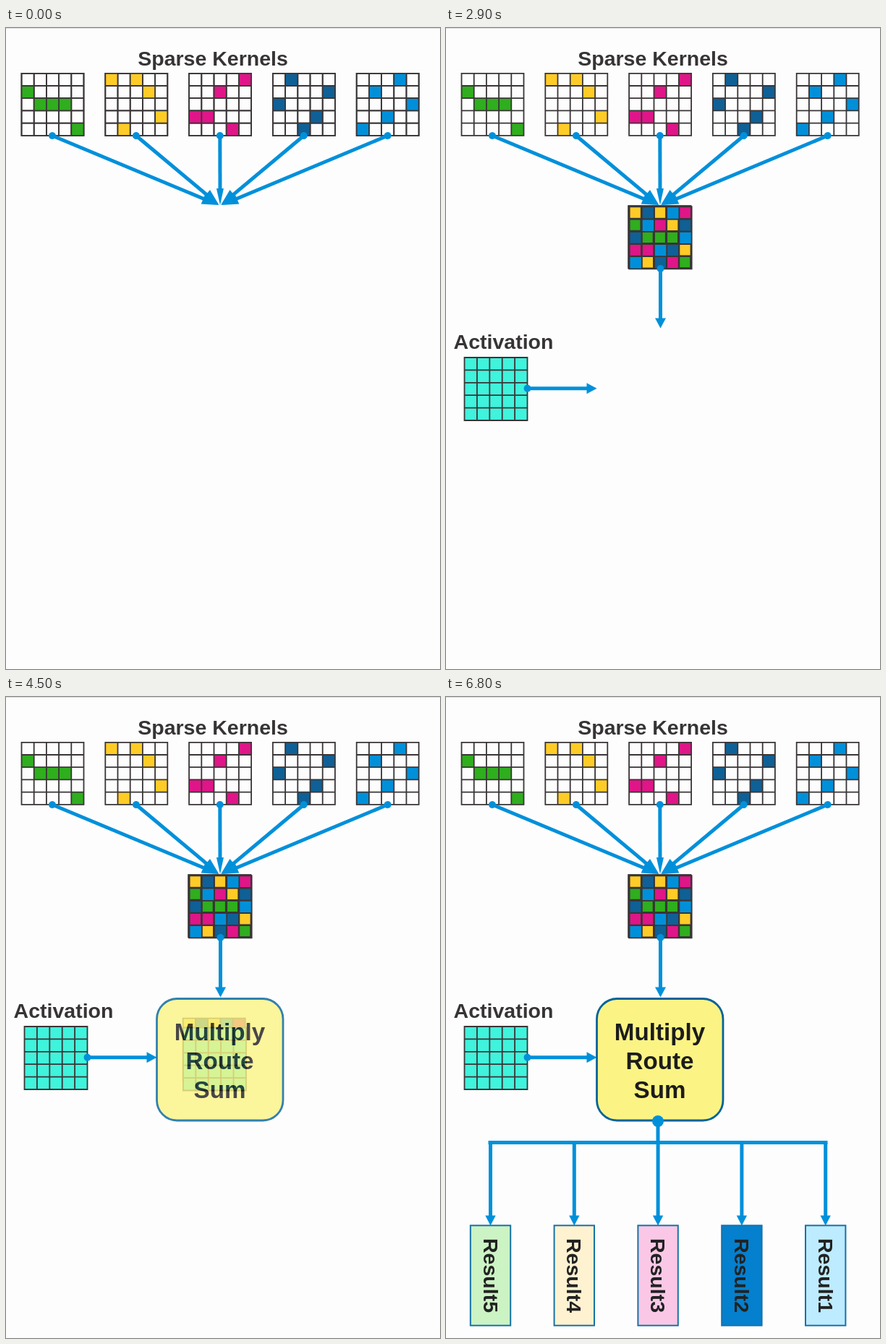
An HTML page for the animation above (6900 ms loop, 600 by 887 pixels).

```html
<!DOCTYPE html>
<html lang="en">
<head>
<meta charset="utf-8">
<title>Sparse Kernels</title>
<style>
  html, body { margin: 0; width: 100%; height: 100%; overflow: hidden; background: #fefdfe; }
  svg { display: block; width: 100vw; height: 100vh; }
  text { font-family: "Liberation Sans", Arial, sans-serif; font-weight: bold; font-size: 28.5px; fill: #373435; }
  .mid { text-anchor: middle; }
</style>
</head>
<body>
<svg id="stage" viewBox="0 0 600 887"></svg>
<script>
const LOOP = 6900;
const INK = '#393536', BLUE = '#0090da';
const COLORS = { G: '#2fae1e', Y: '#ffcc27', P: '#e01588', N: '#0f6096', B: BLUE };
const ORDER = 'GYPNB';
const PATTERN = 'YNYBPGBPYNNGGGBPPBNYBYNPG';
const RESULTS = ['#ccf3c4', '#fff2d0', '#fac8e6', '#0480ce', '#bdebff'];
const stage = document.getElementById('stage');

function add(parent, tag, attrs = {}, text = '') {
  const node = document.createElementNS('http://www.w3.org/2000/svg', tag);
  for (const key in attrs) node.setAttribute(key, attrs[key]);
  node.textContent = text;
  return parent.appendChild(node);
}

const group = (parent = stage) => add(parent, 'g');
const place = (node, x, y) => node.setAttribute('transform', `translate(${x} ${y})`);
const label = (parent, x, y, text, attrs = {}) =>
  add(parent, 'text', { x, y, class: 'mid', ...attrs }, text);

// A 5 by 5 grid; fillOf returns a colour or nothing for each cell.
function grid(parent, x, y, size, fillOf) {
  const g = group(parent), step = size / 5;
  for (let i = 0; i < 25; i++) {
    const fill = fillOf(PATTERN[i]);
    if (fill) add(g, 'rect', { x: i % 5 * step, y: Math.floor(i / 5) * step, width: step, height: step, fill });
  }
  let d = '';
  for (let i = 0; i <= 5; i++) d += `M${i * step} -.9V${size + .9}M-.9 ${i * step}H${size + .9}`;
  add(g, 'path', { d, stroke: INK, 'stroke-width': 1.8 });
  place(g, x, y);
  return g;
}

function arrow(parent, x1, y1, x2, y2, length, half, dot = 5) {
  const span = Math.hypot(x2 - x1, y2 - y1);
  const angle = Math.atan2(y2 - y1, x2 - x1) * 180 / Math.PI;
  const g = add(parent, 'g', { transform: `translate(${x1} ${y1}) rotate(${angle})`, fill: BLUE });
  add(g, 'path', { d: `M0 0H${span - length + 1}`, stroke: BLUE, 'stroke-width': 5 });
  add(g, 'path', { d: `M${span} 0l${-length} ${-half}v${2 * half}z` });
  if (dot) add(g, 'circle', { r: dot });
}

add(stage, 'rect', { width: 600, height: 1, fill: '#dcdcdc' });
label(stage, 286, 52, 'Sparse Kernels');

const kernelX = i => 21.5 + 115.8 * i;
const kernelFill = i => c => c === ORDER[i] && COLORS[c];
const kernels = [...ORDER].map((_, i) => grid(stage, kernelX(i), 62.8, 86, kernelFill(i)));
const movers = kernels.map((_, i) => grid(stage, kernelX(i), 62.8, 86, kernelFill(i)));
const mergedCopy = grid(stage, 0, 0, 86, c => COLORS[c]);

const activation = group();
const aqua = () => '#40f3dc';
label(activation, 79.5, 444, 'Activation');
grid(activation, 25.5, 456, 87, aqua);
const activationCopy = grid(stage, 0, 0, 87, aqua);

const tips = [294, 294.5, 296, 297, 298];
tips.forEach((tip, i) =>
  arrow(stage, 64 + 115.9 * i, 149, tip, 245, 23, i === 2 ? 5 : 8));

const inputs = group();
arrow(inputs, 296.5, 333, 296.5, 415.5, 14, 7.5);
arrow(inputs, 112.5, 498.7, 208.5, 498.7, 14, 7.5);

const box = group();
add(box, 'rect', { x: 208.5, y: 417.5, width: 174.5, height: 168.5, rx: 28,
  fill: '#fbf484', stroke: '#00639c', 'stroke-width': 2.8 });
['Multiply', 'Route', 'Sum'].forEach((word, i) =>
  label(box, 295.5, 475 + 40 * i, word, { style: 'font-size:33.2px;fill:#1c1c1c' }));

const output = group();
add(output, 'path', { d: 'M293 587V616.5M58.5 616.5H527.5', stroke: BLUE, 'stroke-width': 5 });
add(output, 'circle', { cx: 293, cy: 587, r: 8, fill: BLUE });
RESULTS.forEach((fill, i) => {
  const x = 61.5 + 115.8 * i;
  arrow(output, x, 616.5, x, 731.5, 14, 7.2, 0);
  add(output, 'rect', { x: x - 27.7, y: 731.3, width: 55.4, height: 138.4,
    fill, stroke: '#1673a6', 'stroke-width': 2 });
  label(output, 0, 0, 'Result' + (5 - i),
    { transform: `translate(${x - 10} 800.5) rotate(90)`, style: 'fill:#222' });
});

const progress = (t, start, length) => Math.min(1, Math.max(0, (t - start) / length));
const smooth = u => u < .5 ? 2 * u * u : 1 - 2 * (1 - u) ** 2;
const fade = (node, t, start) => node.setAttribute('opacity', progress(t, start, 500));
const show = (node, on) => node.setAttribute('visibility', on ? 'visible' : 'hidden');

function render(t) {
  const merge = smooth(progress(t, 100, 1300));
  movers.forEach((node, i) => {
    const x = kernelX(i), toX = 252.2 + .35 * i, toY = 246.2 + .3 * i;
    place(node, x + (toX - x) * merge, 62.8 + (toY - 62.8) * merge);
  });

  fade(activation, t, 2200);
  fade(inputs, t, 2200);

  const feed = smooth(progress(t, 3340, 1400));
  place(mergedCopy, 252.9 - 8.7 * feed, 246.8 + 210 * feed);
  place(activationCopy, 25.5 + 233 * feed, 456 + 1.6 * feed);
  for (const node of [mergedCopy, activationCopy]) show(node, feed > 0 && feed < 1);

  fade(box, t, 4100);
  fade(output, t, 5600);
}

const origin = performance.now();
function tick() {
  render((performance.now() - origin) % LOOP);
  requestAnimationFrame(tick);
}
render(0);
requestAnimationFrame(tick);
</script>
</body>
</html>
```
